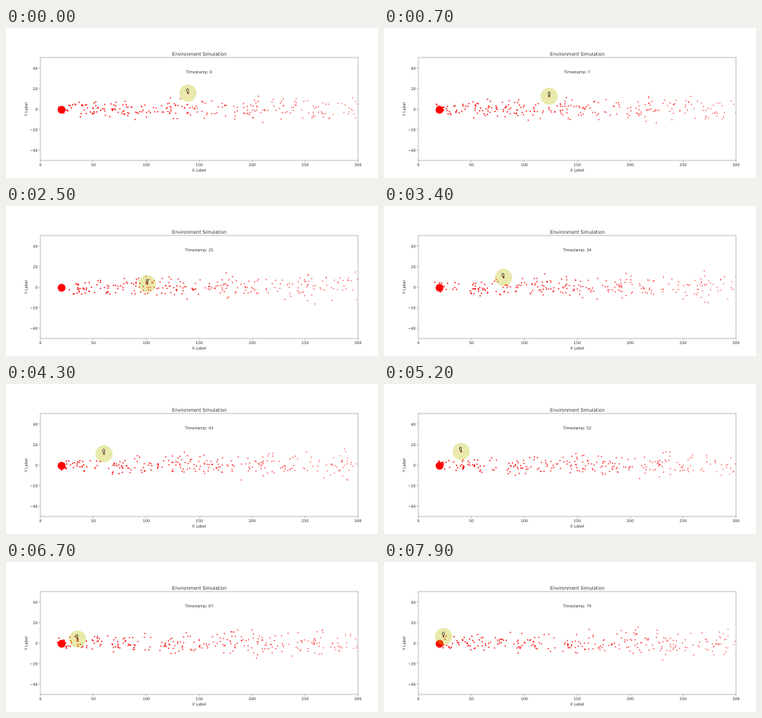
A matplotlib script for the animation above (8 s loop, 465 px wide and 188 px high).

```python
import numpy as np
import matplotlib.pyplot as plt
from matplotlib import patheffects
from matplotlib.animation import FuncAnimation

W, H, DPI = 465, 188, 34
STEPS, STEP_MS = 80, 100
SOURCE = (20, 0)
WIND = 2.0        # drift per step
SPREAD = 5        # half-width of the release area
JITTER = 0.5      # random walk per step
HISTORY = 165     # steps of plume released before the start
INK, LINE = "#262626", "#5a5a5a"

# Path effects draw text as outlines, placed at sub-pixel precision.
plt.rcParams.update({
    "font.family": "DejaVu Sans", "text.hinting": "none",
    "path.effects": [patheffects.Normal()],
    "text.color": INK, "axes.labelcolor": INK, "axes.edgecolor": LINE,
    "xtick.color": LINE, "ytick.color": LINE,
    "xtick.labelcolor": INK, "ytick.labelcolor": INK,
})


def area(px):
    """Scatter size for a disc of the given pixel diameter."""
    return (np.asarray(px) * 72 / DPI) ** 2


def make_plume(rng):
    """Birth step and random-walk track of every particle."""
    births = np.arange(-HISTORY, STEPS)
    bursts = rng.choice([0, 1, 2, 3, 5], size=births.size,
                        p=[0.25, 0.25, 0.25, 0.16, 0.09])
    births = np.repeat(births, bursts)
    start = rng.uniform(-SPREAD, SPREAD, (births.size, 1, 2))
    walk = rng.normal(0, JITTER, (births.size, HISTORY + STEPS, 2))
    walk[:, 0] = 0
    tracks = start + walk.cumsum(axis=1) + SOURCE
    tracks[:, :, 0] += WIND * np.arange(HISTORY + STEPS)
    return births, tracks


births, tracks = make_plume(np.random.default_rng(7))

# Agent waypoints: step, x, y
way = np.array([(0, 139, 16.2), (14, 108, 9.7), (25, 100.8, 3.9),
                (34, 79.9, 9.7), (52, 39.7, 13.9), (67, 34.5, 4.6),
                (79, 23.5, 7.0)])

fig = plt.figure(figsize=((W + 1e-6) / DPI, (H + 1e-6) / DPI), dpi=DPI,
                 facecolor="white")
left, right, top, bottom = 43, 440, 37.5, 166
ax = fig.add_axes([left / W, 1 - bottom / H,
                   (right - left) / W, (bottom - top) / H])
ax.set(xlim=(0, 300), ylim=(-50, 50), title="Environment Simulation",
       xlabel="X Label", ylabel="Y Label",
       xticks=range(0, 301, 50), yticks=range(-40, 41, 20))

plume = ax.scatter([], [], linewidths=0, zorder=2, snap=False)
ax.scatter(*SOURCE, s=area(9.8), c="red", linewidths=0, zorder=3, snap=False)
halo = ax.scatter([], [], s=area(21.4), c="y", alpha=0.33,
                  linewidths=0, zorder=4, snap=False)
body = ax.scatter([], [], s=area(2.1), c="#780000", linewidths=0,
                  zorder=5, snap=False)
label = ax.text(0, 0, "0", fontsize=13, color="black",
                ha="center", va="bottom", zorder=6)
clock = ax.text(150, 35, "", ha="center", zorder=6)


def draw(step):
    alive = births <= step
    pts = tracks[alive, step - births[alive]]
    pts = pts[pts[:, 0] <= 300]
    far = np.clip((pts[:, 0] - 20) / 280, 0, 1)
    rgba = np.zeros((len(pts), 4))
    rgba[:, 0] = 1
    rgba[:, 3] = 1 - 0.4 * far ** 1.5
    plume.set_offsets(pts)
    plume.set_sizes(area(1.7 - 0.25 * far))
    plume.set_facecolors(rgba)

    pos = [np.interp(step, way[:, 0], way[:, k]) for k in (1, 2)]
    halo.set_offsets([pos])
    body.set_offsets([pos])
    label.set_position((pos[0], pos[1] - 0.5))
    clock.set_text(f"Timestamp: {step}")
    return plume, halo, body, label, clock


anim = FuncAnimation(fig, draw, frames=STEPS, interval=STEP_MS,
                     repeat=True, repeat_delay=0, blit=False)
plt.show()
```
